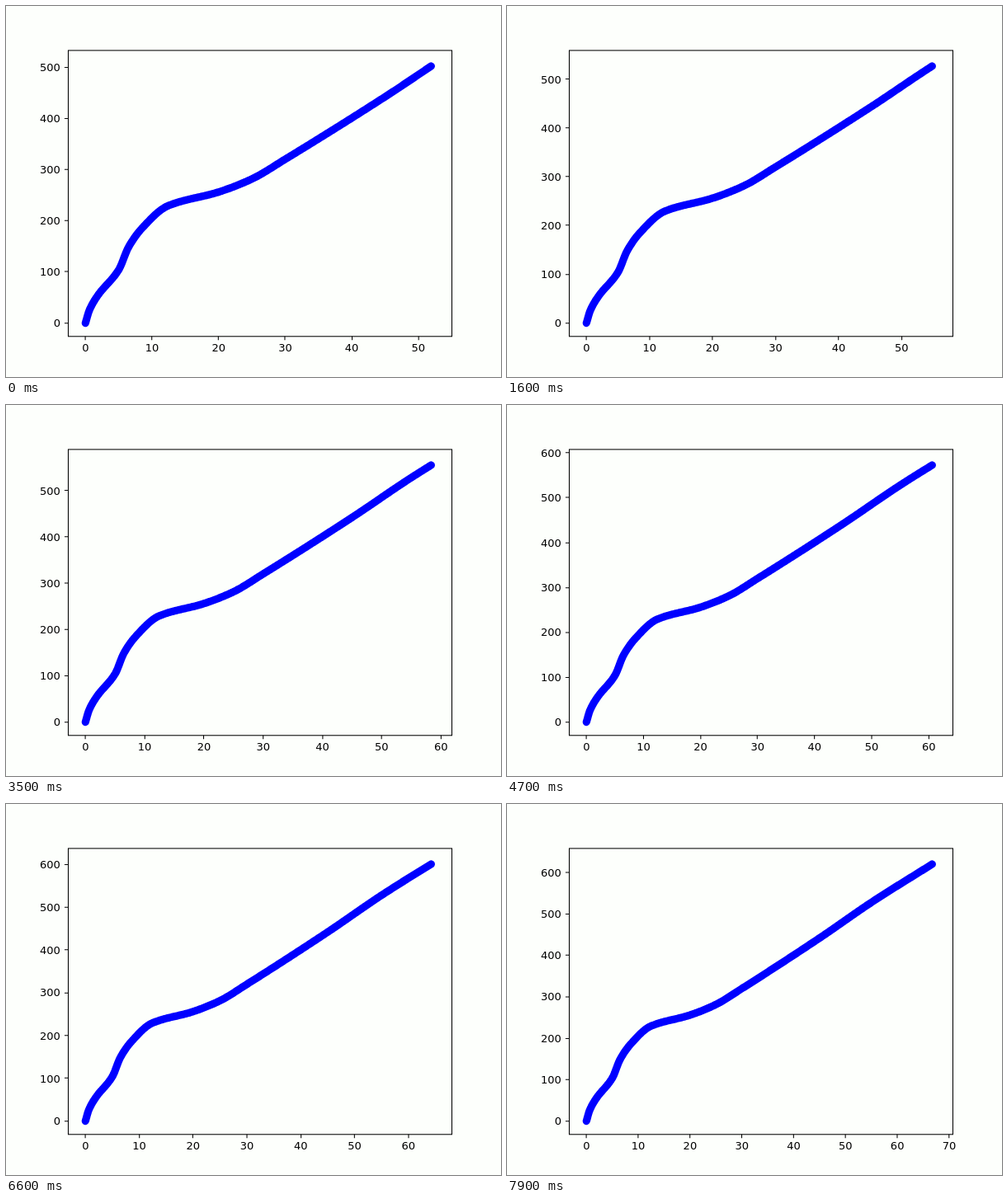
Animation of 600x450 px, one loop 8000 ms. Source, as an HTML page:

```html
<!DOCTYPE html>
<html lang="en">
<head>
<meta charset="utf-8">
<title>Growing curve</title>
<style>
  html, body { margin: 0; width: 100%; height: 100%; overflow: hidden; background: #fdfffc; }
  svg { display: block; width: 600px; height: 450px; }
  text { font: 13.89px "DejaVu Sans", sans-serif; fill: #000; }
  .line { fill: none; stroke: #000; stroke-width: 1.11; }
  #dots { fill: none; stroke: #00f; stroke-width: 9.8; stroke-linecap: round; stroke-linejoin: round; }
</style>
</head>
<body>
<svg viewBox="0 0 640 480">
  <path id="dots"/>
  <rect class="line" x="80.5" y="57.5" width="496" height="370"/>
  <path id="ticks" class="line"/>
  <g id="xLabels" text-anchor="middle"></g>
  <g id="yLabels" text-anchor="end"></g>
</svg>
<script>
const LOOP = 8000, STEP = 100;
const AXES = { left: 80.5, right: 576.5, top: 57.5, bottom: 427.5 };
const ORIGIN = { x: 102.7, y: 410.2 };
const SPAN = { x: 447, y: 332.4 };
const TICK = 4.86;

// Key points of the curve, joined by a monotone cubic
const KEYS = [
  [0, 0], [.62, 26], [1.86, 54], [5, 104], [6.5, 149], [8.55, 186], [12.4, 229],
  [20, 256], [25, 281.5], [30, 320], [45, 442], [55, 528], [66.8, 621]
];

const byId = id => document.getElementById(id);
const snap = v => Math.floor(v) + .5;

function secant(i) {
  const j = Math.min(Math.max(i, 0), KEYS.length - 2);
  return (KEYS[j + 1][1] - KEYS[j][1]) / (KEYS[j + 1][0] - KEYS[j][0]);
}

function slope(i) {
  const before = secant(i - 1), after = secant(i);
  return 2 * before * after / (before + after);
}

function curve(x) {
  let i = 0;
  while (i < KEYS.length - 2 && KEYS[i + 1][0] < x) i++;
  const [x0, y0] = KEYS[i], [x1, y1] = KEYS[i + 1];
  const width = x1 - x0, u = (x - x0) / width, v = 1 - u;
  return y0 * v * v * (1 + 2 * u) + y1 * u * u * (1 + 2 * v)
    + width * u * v * (slope(i) * v - slope(i + 1) * u);
}

function makeLabels(group, step, count) {
  return Array.from({ length: count }, (_, i) => {
    const el = document.createElementNS("http://www.w3.org/2000/svg", "text");
    el.textContent = i * step;
    group.append(el);
    return el;
  });
}
const xLabels = makeLabels(byId("xLabels"), 10, 8);
const yLabels = makeLabels(byId("yLabels"), 100, 7);

function place(label, x, y, visible) {
  label.setAttribute("x", x);
  label.setAttribute("y", y);
  label.style.display = visible ? "" : "none";
}

function draw(time) {
  const k = Math.floor(time % LOOP / STEP);
  const headX = 51.92 + .181 * k + .00008 * k * k;
  const headY = curve(headX);
  const px = x => ORIGIN.x + x * SPAN.x / headX;
  const py = y => ORIGIN.y - y * SPAN.y / headY;

  const points = [];
  const add = x => points.push(px(x).toFixed(2) + " " + py(curve(x)).toFixed(2));
  for (let x = 0; x < headX; x += Math.min(.187, .03 + x / 10)) add(x);
  add(headX);
  byId("dots").setAttribute("d", "M" + points.join("L"));

  let ticks = "";
  xLabels.forEach((label, i) => {
    const x = px(i * 10), visible = x <= AXES.right;
    if (visible) ticks += `M${snap(x)} ${AXES.bottom}v${TICK}`;
    place(label, x, 447, visible);
  });
  yLabels.forEach((label, i) => {
    const y = py(i * 100), visible = y >= AXES.top;
    if (visible) ticks += `M${AXES.left} ${snap(y)}h${-TICK}`;
    place(label, 70.3, Math.round(y + 5), visible);
  });
  byId("ticks").setAttribute("d", ticks);
}

const start = performance.now();
function frame() {
  draw(performance.now() - start);
  requestAnimationFrame(frame);
}
frame();
</script>
</body>
</html>
```
